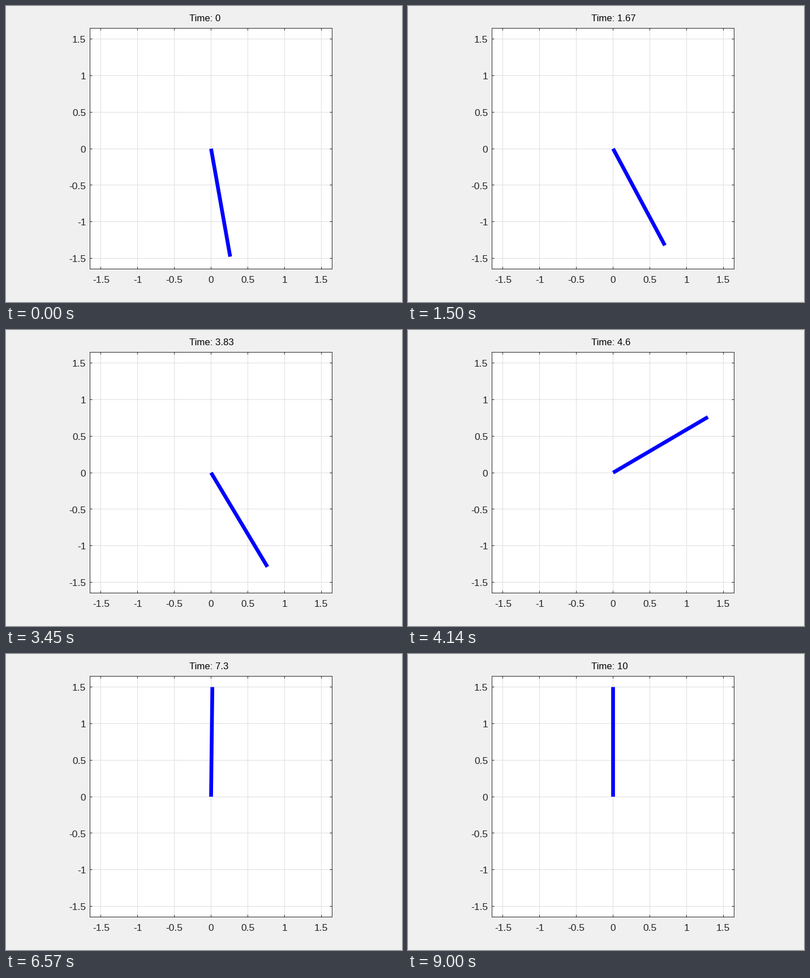
A matplotlib script for the animation above (9.03 s loop, 700x525 px).

```python
import numpy as np
import matplotlib.pyplot as plt
from matplotlib.animation import FuncAnimation
from matplotlib.transforms import Affine2D

W, H, DPI = 700, 525, 100
FPS, FRAMES = 30, 301
ROD = 1.5
INK = "#262626"

G = 9.81                    # gravity term of the angular acceleration
PUSH = 1.815                # torque limit
GAIN = 5.0                  # energy pumping gain
DAMP, STIFF = 4.0, 5.44     # balancing gains near the top
CATCH = np.radians(9)
HELD = {31, 62, 248}        # moments at which the picture stands still


def accel(th, v):
    lean = th + np.pi
    if abs(lean) < CATCH:
        return -DAMP * v - STIFF * lean
    lack = 2 * G - (0.5 * v * v + G * (1 - np.cos(th)))
    push = max(-PUSH, min(PUSH, GAIN * lack * v))
    return push - G * np.sin(th)


def swing_up(substeps=150):
    dt = 1 / (FPS * substeps)
    th, v = np.radians(10), 0.0
    path = [th]
    for _ in range(FRAMES - 1):
        for _ in range(substeps):
            v += accel(th, v) * dt
            th += v * dt
        path.append(th)
    return path


def px(size):
    return size * 72 / DPI


plt.rcParams["font.family"] = "Liberation Sans"
fig = plt.figure(figsize=(W / DPI, H / DPI), dpi=DPI, facecolor="#f0f0f0")

# thin lines snap to whole pixels, so the box sits half a pixel up and left
left, right, top, bottom = 148.0, 576.0, 38.7, 466.45
ax = fig.add_axes([left / W, 1 - bottom / H,
                   (right - left) / W, (bottom - top) / H])
ax.set(xlim=(-1.65, 1.65), ylim=(-1.65, 1.65))
ticks = np.arange(-1.5, 1.6, 0.5)
ax.set_xticks(ticks)
ax.set_yticks(ticks)
ax.tick_params(direction="in", length=px(4), width=px(1), color=INK,
               top=True, right=True, labelleft=False, labelbottom=False)
ax.grid(color="#dedede", linewidth=px(1))
ax.set_axisbelow(True)
for spine in ax.spines.values():
    spine.set(color=INK, linewidth=px(1))


def label(x, y, text, size, **kw):
    return fig.text(x / W, 1 - y / H, text, fontsize=px(size),
                    va="baseline", **kw)


for t in ticks:
    share = (t + 1.65) / 3.3
    label(left + share * (right - left) + 0.5, 491.3, f"{t:g}", 17.33,
          ha="center", color=INK)
    label(141.5, bottom - share * (bottom - top) + 7.3, f"{t:g}", 17.33,
          ha="right", color=INK)

title = label(324, 27.2, "", 16.7, ha="left", color="black")
rod, = ax.plot([], [], color="#0000ff", linewidth=px(6.67),
               solid_capstyle="butt", snap=False, zorder=5,
               transform=ax.transData + Affine2D().translate(0.5, -0.5))
angles = swing_up()


def draw(i):
    if i in HELD:
        i -= 1
    th = angles[i]
    rod.set_data([0, ROD * np.sin(th)], [0, -ROD * np.cos(th)])
    title.set_text(f"Time: {i / FPS:.3g}")
    return rod, title


anim = FuncAnimation(fig, draw, frames=FRAMES, interval=30, repeat=True)
plt.show()
```
